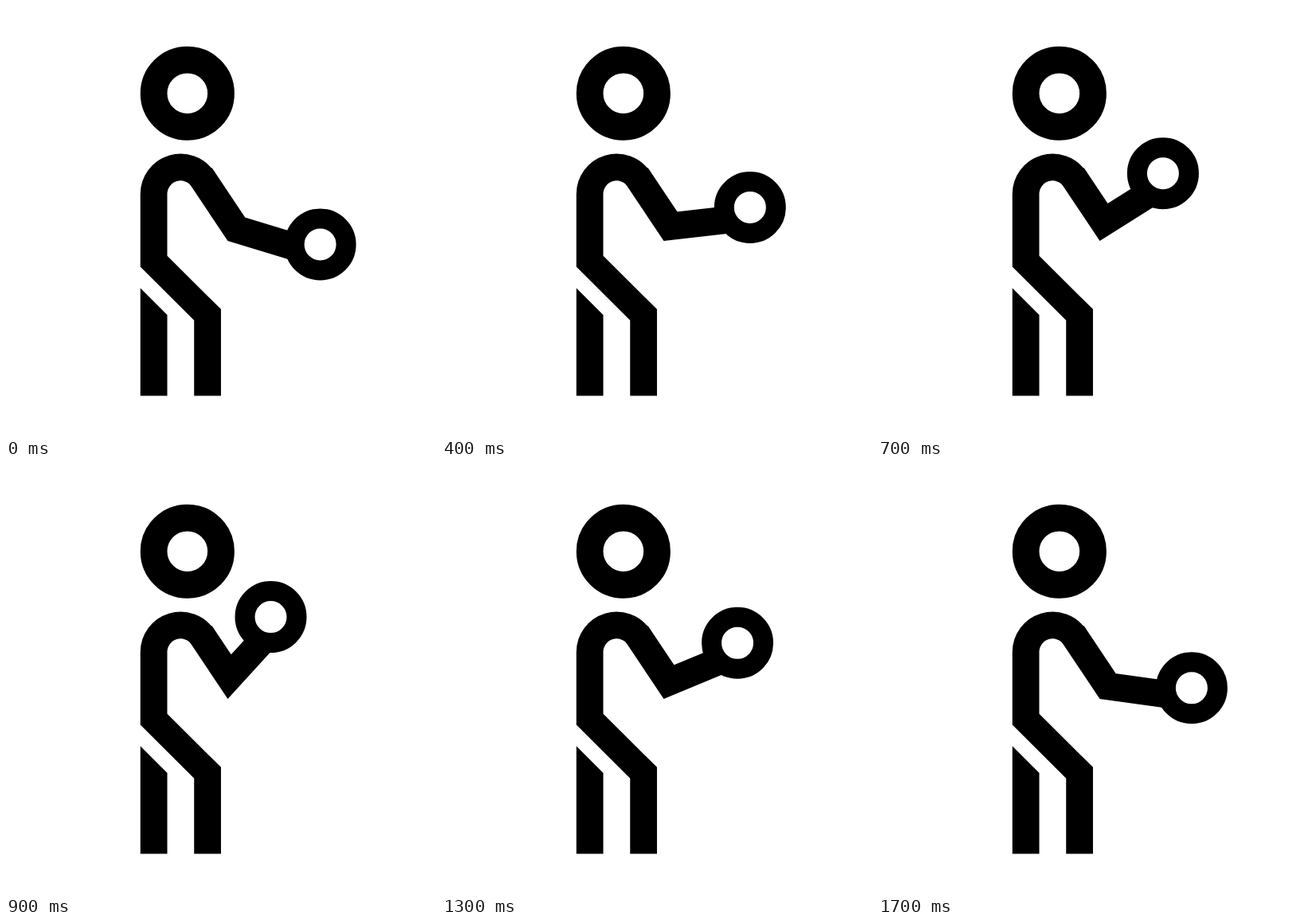
Recreate the animation shown at these times as an HTML page. Size 540x540 px, loop 1.8 s.

```html
<!DOCTYPE html>
<html lang="en">
<head>
<meta charset="utf-8">
<title>Arm lift</title>
<style>
  html, body { margin: 0; width: 100%; height: 100%; overflow: hidden; background: #fff; }
  svg { display: block; width: 100vw; height: 100vh; }
</style>
</head>
<body>
<svg viewBox="0 0 540 540">
  <g fill="none" stroke="#000" stroke-width="33.75" stroke-miterlimit="8">
    <circle cx="227.8" cy="109.7" r="42.2"/>
    <path d="M253.1 489.4V387.8L185.6 320.6V236.25A33.75 33.75 0 0 1 247.4 217.5"/>
    <path d="M168.75 354.2L202.5 388V489.4H168.75Z" fill="#000" stroke="none"/>
    <path id="arm" stroke-width="34.5"/>
    <circle id="weight" r="32.5" stroke-width="25"/>
  </g>
</svg>
<script>
  const STEP = 100, LOOP = 1800;
  const ELBOW = { x: 278.5, y: 295 };    // outer tip of the elbow, the pivot
  const SHOULDER = { x: 230, y: 222.5 }; // inner edge where the upper arm begins
  const HALF = 17.25;                    // half the arm thickness
  const FOREARM = 86, REACH = 116.2;     // distances from the pivot
  const REST = 2.2, SKEW = 14.7;         // weight angle at rest, forearm offset from it
  const LIFT = [0, 9, 16.3, 23.4, 31.2, 39.4, 49.1, 56.8, 64.5];

  const arm = document.getElementById('arm');
  const weight = document.getElementById('weight');
  const rad = deg => deg * Math.PI / 180;
  const polar = (p, angle, r) => ({ x: p.x + r * Math.cos(angle), y: p.y + r * Math.sin(angle) });
  const normal = angle => ({ x: Math.sin(angle), y: -Math.cos(angle) });
  const shift = (p, n, d) => ({ x: p.x + n.x * d, y: p.y + n.y * d });
  const str = p => p.x.toFixed(2) + ' ' + p.y.toFixed(2);

  const upperAngle = Math.atan2(ELBOW.y - SHOULDER.y, ELBOW.x - SHOULDER.x);
  const n1 = normal(upperAngle);

  function pose(lift) {
    const angle = rad(REST - lift);
    const foreAngle = angle + rad(SKEW);
    const n2 = normal(foreAngle);
    // centre of the joint whose outer miter lands on the pivot
    const k = HALF / (1 + n1.x * n2.x + n1.y * n2.y);
    const joint = shift(ELBOW, { x: n1.x + n2.x, y: n1.y + n2.y }, k);
    const start = shift(SHOULDER, n1, HALF);
    const end = shift(polar(ELBOW, foreAngle, FOREARM), n2, HALF);
    arm.setAttribute('d', `M${str(start)}L${str(joint)}L${str(end)}`);

    const c = polar(ELBOW, angle, REACH);
    weight.setAttribute('cx', c.x);
    weight.setAttribute('cy', c.y);
  }

  function frame() {
    const tick = Math.floor(performance.now() % LOOP / STEP);
    pose(LIFT[tick < 10 ? Math.max(0, tick - 1) : Math.min(8, 18 - tick)]);
    requestAnimationFrame(frame);
  }
  frame();
</script>
</body>
</html>
```
